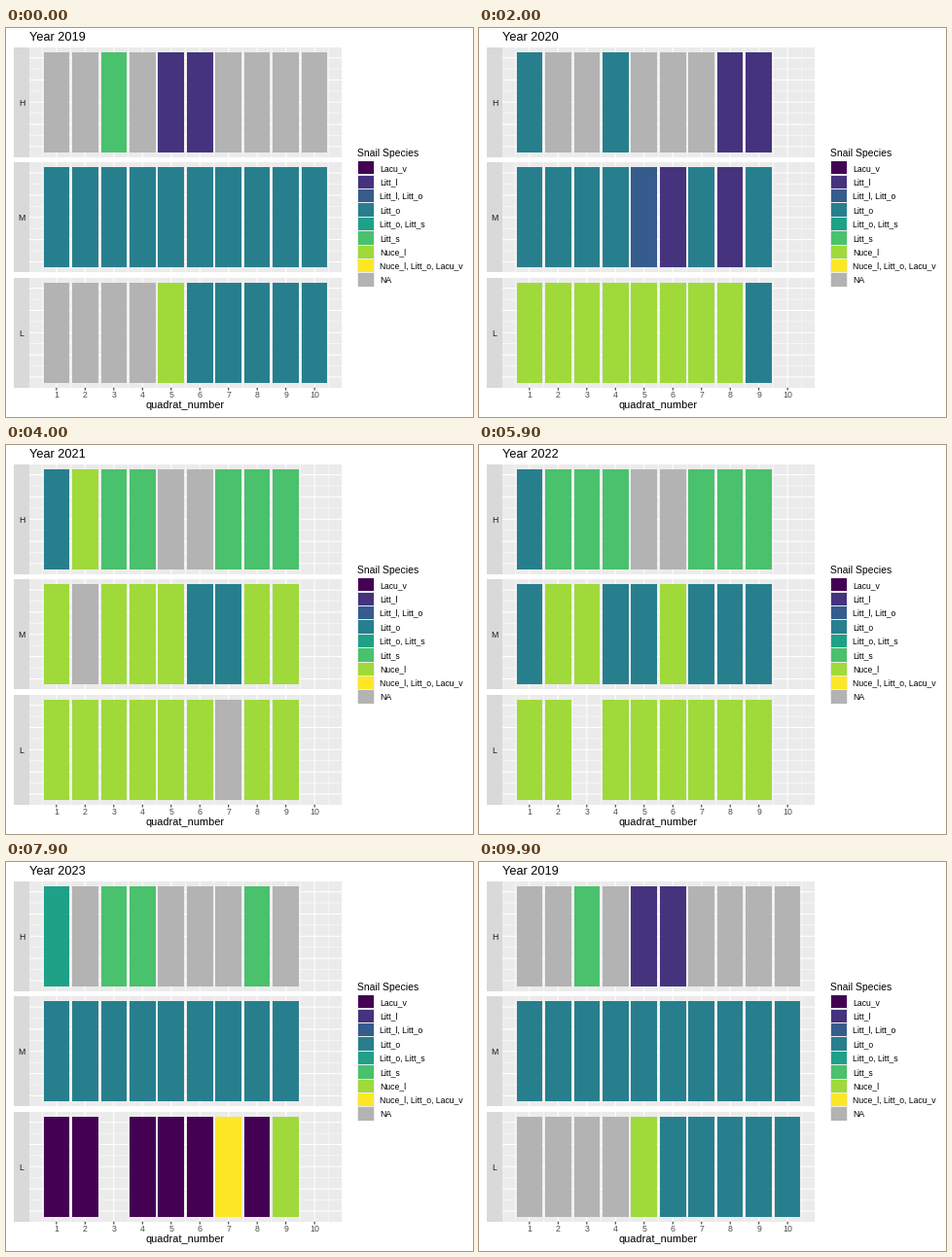
Write a matplotlib script that moves like this. It is 480x400 px and loops after 10000 ms.

```python
import matplotlib.pyplot as plt
from matplotlib.animation import FuncAnimation
from matplotlib.patches import Rectangle

W, H, DPI = 480, 400, 100
STEP, LOOP = 100, 10000

SPECIES = ["Lacu_v", "Litt_l", "Litt_l, Litt_o", "Litt_o", "Litt_o, Litt_s",
           "Litt_s", "Nuce_l", "Nuce_l, Litt_o, Lacu_v", "NA"]
COLORS = ["#440154", "#46337E", "#365C8D", "#277F8E", "#1FA187",
          "#4AC16D", "#9FDA3A", "#FDE725", "#B3B3B3"]

# One digit per quadrat: index into SPECIES, "." where nothing was recorded.
SURVEYS = {
    2019: ("8858118888", "3333333333", "8888633333"),
    2020: ("388388811.", "333321313.", "666666663."),
    2021: ("365588555.", "686663366.", "666666866."),
    2022: ("355588555.", "366336333.", "66.666666."),
    2023: ("485588858.", "333333333.", "00.000706."),
}
YEARS = list(SURVEYS)
TITLE_TIMES = (1600, 3600, 5500, 7500, 9500)
DATA_TIMES = (2000, 4000, 5900, 7900, 9900)

LEFT, RIGHT = 24, 345
UNIT = (RIGHT - LEFT) / 10.89
TOPS = (19.8, 138.3, 256.8)
PANEL_H = 113
TILE_PAD = PANEL_H / 22
LEVELS = "HML"

plt.rcParams["font.family"] = "Liberation Sans"
fig = plt.figure(figsize=(W / DPI, H / DPI), dpi=DPI, facecolor="white")
ax = fig.add_axes((0, 0, 1, 1))
ax.set(xlim=(0, W), ylim=(H, 0))
ax.axis("off")


def px(size):
    return size * 72 / DPI


def quad_x(n):
    return LEFT + (n - 0.055) * UNIT


def box(x0, y0, x1, y1, color, z=1):
    return ax.add_patch(Rectangle((x0, y0), x1 - x0, y1 - y0,
                                  facecolor=color, linewidth=0, zorder=z))


def line(xs, ys, width, color="white", z=2):
    ax.plot(xs, ys, color=color, lw=px(width), zorder=z,
            solid_capstyle="butt", snap=False)


def label(x, y, text, size, color="black", ha="left"):
    return ax.text(x, y, text, fontsize=px(size), color=color,
                   ha=ha, va="baseline", zorder=5)


def draw_panel(top, level):
    y0, y1 = round(top), round(top + PANEL_H)
    box(8, y0, LEFT, y1, "#D9D9D9")
    box(LEFT, y0, RIGHT, y1, "#EBEBEB")
    label(16, top + PANEL_H / 2 + 3.6, level, 8.8, "#1A1A1A", "center")

    for k in range(11):
        x = quad_x(k + 0.5)
        if x < RIGHT:
            line((x, x), (y0, y1), 0.53)
    for k in range(1, 11):
        line((quad_x(k),) * 2, (y0, y1), 1.07)

    # Grid from 1.4 down to 0.6, with every second line a minor one.
    gap = (PANEL_H - 2 * TILE_PAD) / 9
    for k in range(9):
        y = top + TILE_PAD + (k + 0.5) * gap
        line((LEFT, RIGHT), (y, y), 0.53 if k % 2 else 1.07)


def make_tiles(top):
    y0 = round(top + TILE_PAD)
    y1 = round(top + PANEL_H - TILE_PAD)
    half = 0.45 * UNIT
    return [box(round(quad_x(n) - half), y0, round(quad_x(n) + half), y1,
                "white", 3) for n in range(1, 11)]


def draw_axis():
    base = TOPS[-1] + PANEL_H
    for n in range(1, 11):
        x = quad_x(n)
        line((x, x), (base, base + 2.75), 1.07, "#333333")
        label(x, 380.5, str(n), 8.8, "#4D4D4D", "center")
    label((LEFT + RIGHT) / 2, 391, "quadrat_number", 11, ha="center")


def draw_legend():
    label(361, 132, "Snail Species", 10.4)
    for k, (name, color) in enumerate(zip(SPECIES, COLORS)):
        y = 136.7 + 14.4 * k
        box(361.2, y, 378.5, y + 14.4, "#EBEBEB")
        box(361.9, y + 0.6, 377.9, y + 13.8, color, 3)
        label(384.1, y + 10.2, name, 8.6)


for top, level in zip(TOPS, LEVELS):
    draw_panel(top, level)
tiles = [make_tiles(top) for top in TOPS]
draw_axis()
draw_legend()
title = label(24, 13, "", 12.7)


def year_at(t, times):
    return YEARS[sum(t >= s for s in times) % len(YEARS)]


def update(i):
    t = i * STEP
    title.set_text(f"Year {year_at(t, TITLE_TIMES)}")
    for row, codes in zip(tiles, SURVEYS[year_at(t, DATA_TIMES)]):
        for tile, code in zip(row, codes):
            tile.set_visible(code != ".")
            if code != ".":
                tile.set_facecolor(COLORS[int(code)])
    return [title]


anim = FuncAnimation(fig, update, frames=LOOP // STEP, interval=STEP,
                     repeat=True, repeat_delay=0, blit=False)
plt.show()
```
